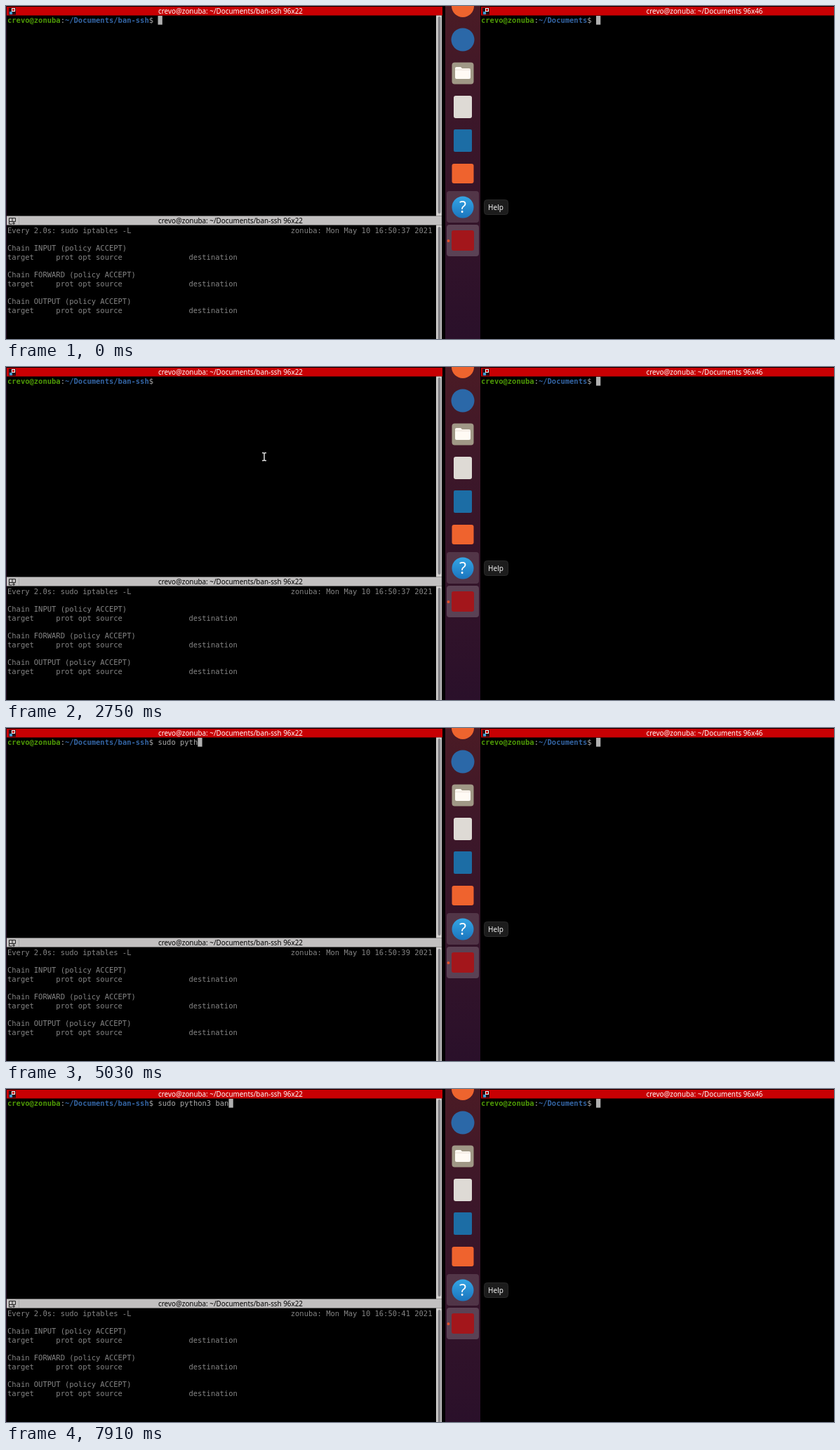
An HTML page that plays this animation: 1180x475 px, repeating every 8000 ms.

```html
<!DOCTYPE html>
<html lang="en">
<head>
<meta charset="utf-8">
<title>Terminal session</title>
<style>
  html, body { margin: 0; width: 100%; height: 100%; overflow: hidden; background: #000; }
  svg { display: block; }
  text { white-space: pre; }
  .mono { font: 10.48px "DejaVu Sans Mono", monospace; fill: #aaa; }
  .dim { fill: #858585; }
  .user { font-weight: bold; fill: #4e9a06; }
  .path { font-weight: bold; fill: #3465a4; }
  .title { font: 9.85px "Noto Sans", "Open Sans", sans-serif; text-anchor: middle; }
</style>
</head>
<body>
<svg width="1180" height="475" viewBox="0 0 1180 475">
  <defs>
    <linearGradient id="dock" x2="0" y2="1">
      <stop offset="0" stop-color="#4b1b25"/>
      <stop offset=".3" stop-color="#3d1729"/>
      <stop offset="1" stop-color="#2a102a"/>
    </linearGradient>
    <linearGradient id="blue" x2="0" y2="1">
      <stop offset="0" stop-color="#35a5e5"/>
      <stop offset="1" stop-color="#1b75bd"/>
    </linearGradient>
    <g id="panes">
      <path d="M4 2.500h10v10H4z" fill="#2a0c12"/>
      <path d="M8 3h5v5H8z" fill="#fff"/>
      <path d="M9 4h3v3H9z" fill="#c00"/>
      <path d="M5 8h4v4H5z" fill="#3f9bd0"/>
    </g>
  </defs>
  <rect width="1180" height="475"/>
  <path d="M0 0h1v475H0z" fill="#2b1029"/>

  <!-- Window frames -->
  <path d="M1 1h621v12.500H1zM677 1h503v12.500H677z" fill="#c80003"/>
  <path d="M1 299.500h620v13H1z" fill="#c2c0c0"/>
  <path d="M613 13.500h8v286h-8zM613 312.500h8v163h-8z" fill="#d3d1d0"/>
  <rect x="615.5" y="15" width="4" height="281" rx="2" fill="#87868a"/>
  <rect x="615.5" y="315" width="4" height="165" rx="2" fill="#87868a"/>
  <use href="#panes"/>
  <use href="#panes" x="675"/>
  <path d="M4.500 302.500h9v5h-9zM9 302v6M4.500 307v4h4M11 308v4M9 310h4" fill="none" stroke="#222"/>
  <path d="M18.500 301v11" stroke="#aaa"/>
  <text id="topTitle" class="title" x="320" y="11" fill="#fff"></text>
  <text id="lowTitle" class="title" x="320" y="310" fill="#000"></text>
  <text id="sideTitle" class="title" x="995.5" y="11" fill="#fff"></text>

  <!-- Dock -->
  <path d="M626 0h50v475h-50z" fill="url(#dock)"/>
  <rect x="628" y="264" width="46" height="45" rx="4" fill="#fff" opacity=".14"/>
  <rect x="628" y="312" width="46" height="45" rx="4" fill="#fff" opacity=".2"/>
  <circle cx="651" cy="0" r="16" fill="#ee642e"/>
  <circle cx="651" cy="48" r="16.5" fill="#2b68a8"/>
  <rect x="635.5" y="80.5" width="31" height="31" rx="4" fill="#a09886"/>
  <path d="M640 89q0-2 2-2h6l2 2h10q2 0 2 2v11q0 2-2 2h-18q-2 0-2-2z" fill="#fffaf4"/>
  <path d="M640 91h22" stroke="#e8ded5"/>
  <rect x="638" y="128" width="26" height="32" rx="3" fill="#dedad5"/>
  <rect x="638" y="176" width="26" height="32" rx="2" fill="#1c6da5"/>
  <rect x="635.5" y="225" width="31" height="28" rx="3" fill="#ef632e"/>
  <circle cx="651" cy="287" r="15.5" fill="url(#blue)"/>
  <text x="651" y="295" text-anchor="middle" fill="#fff" font-family="Noto Sans, sans-serif" font-size="23">?</text>
  <rect x="635" y="320" width="32" height="29" rx="3" fill="#a3161b"/>
  <circle cx="630.5" cy="335" r="2" fill="#e3502a"/>
  <rect x="681.5" y="276.5" width="34" height="21" rx="4" fill="#1c1c1c" stroke="#292929"/>
  <text x="698" y="290.5" text-anchor="middle" fill="#f2f2f2" font-family="Noto Sans, sans-serif" font-size="10">Help</text>

  <!-- Terminal text -->
  <g id="term"></g>
  <text id="typed" class="mono" y="24"></text>
  <rect id="caret" y="14" width="6.3" height="12.65" fill="#b0b0b0"/>
  <rect x="841" y="14" width="6.3" height="12.65" fill="#b0b0b0"/>

  <!-- Mouse pointers, both centred on the origin -->
  <path id="hand" d="M-4-8q2-1 2.500 1v4q2-1 2.500 0 2-1 2.500.500 2-.500 2.500 1v4l-1 5.500H-1L-5 3.500q-1.500-2 .500-2l1 .500V-7z" fill="#fff" stroke="#222" stroke-width=".5"/>
  <path id="beam" d="M-3-5.500h2l1 1 1-1h2M0-5V5M-3 5.500h2l1-1 1 1h2" fill="none" stroke="#ddd" stroke-width="1.5"/>
</svg>
<script>
const LOOP = 8000, CHAR = 6.309, LINE = 12.65, LEFT = 2;
const USER = 'crevo', HOST = 'zonuba', LOGIN = USER + '@' + HOST;
const $ = id => document.getElementById(id);
const column = n => LEFT + n * CHAR;
const lowRow = n => 323.8 + n * LINE;

function addText(x, y, content, cls = '') {
  const el = document.createElementNS('http://www.w3.org/2000/svg', 'text');
  el.setAttribute('x', x);
  el.setAttribute('y', y);
  el.setAttribute('class', 'mono ' + cls);
  el.innerHTML = content;
  $('term').append(el);
  return el;
}

const prompt = path => `<tspan class="user">${LOGIN}</tspan>:<tspan class="path">${path}</tspan>$`;

$('topTitle').textContent = $('lowTitle').textContent = LOGIN + ': ~/Documents/ban-ssh 96x22';
$('sideTitle').textContent = LOGIN + ': ~/Documents 96x46';
addText(LEFT, 24, prompt('~/Documents/ban-ssh'));
addText(677, 24, prompt('~/Documents'));

addText(LEFT, lowRow(0), 'Every 2.0s: sudo iptables -L', 'dim');
const clock = addText(column(64), lowRow(0), '', 'dim');
['INPUT', 'FORWARD', 'OUTPUT'].forEach((chain, i) => {
  addText(LEFT, lowRow(2 + 3 * i), `Chain ${chain} (policy ACCEPT)`, 'dim');
  addText(LEFT, lowRow(3 + 3 * i), 'target     prot opt source'.padEnd(41) + 'destination', 'dim');
});

const COMMAND = 'sudo python3 ban', INPUT_COLUMN = 34;
const KEYS = [3520, 3680, 3820, 3970, 4130, 4480, 4650, 4840, 5020, 5230, 5420,
  6150, 6420, 6740, 7150, 7450];
$('typed').setAttribute('x', column(INPUT_COLUMN));

// Eased progress between two times
function ease(t, from, to) {
  const p = Math.min(1, Math.max(0, (t - from) / (to - from)));
  return p * p * (3 - 2 * p);
}

function show(id, on) {
  $(id).setAttribute('visibility', on ? 'visible' : 'hidden');
}

function draw(t) {
  const count = KEYS.filter(k => k <= t).length;
  $('typed').textContent = COMMAND.slice(0, count);
  $('caret').setAttribute('x', column(INPUT_COLUMN + count));
  const phase = t % 1200;
  show('caret', count > 0 || phase < 150 || phase >= 750);

  const second = 37 + (t >= 2800 ? 2 : 0) + (t >= 5400 ? 2 : 0);
  clock.textContent = `${HOST}: Mon May 10 16:50:${second} 2021`;

  const a = ease(t, 400, 1250), b = ease(t, 1800, 2450);
  const x = 650 - 273 * a - 9 * b, y = 290 - 138 * a - 24 * b;
  const moving = t >= 400 && t < KEYS[0];
  for (const id of ['hand', 'beam']) $(id).setAttribute('transform', `translate(${x} ${y})`);
  show('hand', moving && t < 2000);
  show('beam', moving && t >= 2000);
}

const start = performance.now();
function tick() {
  draw((performance.now() - start) % LOOP);
  requestAnimationFrame(tick);
}
tick();
</script>
</body>
</html>
```
